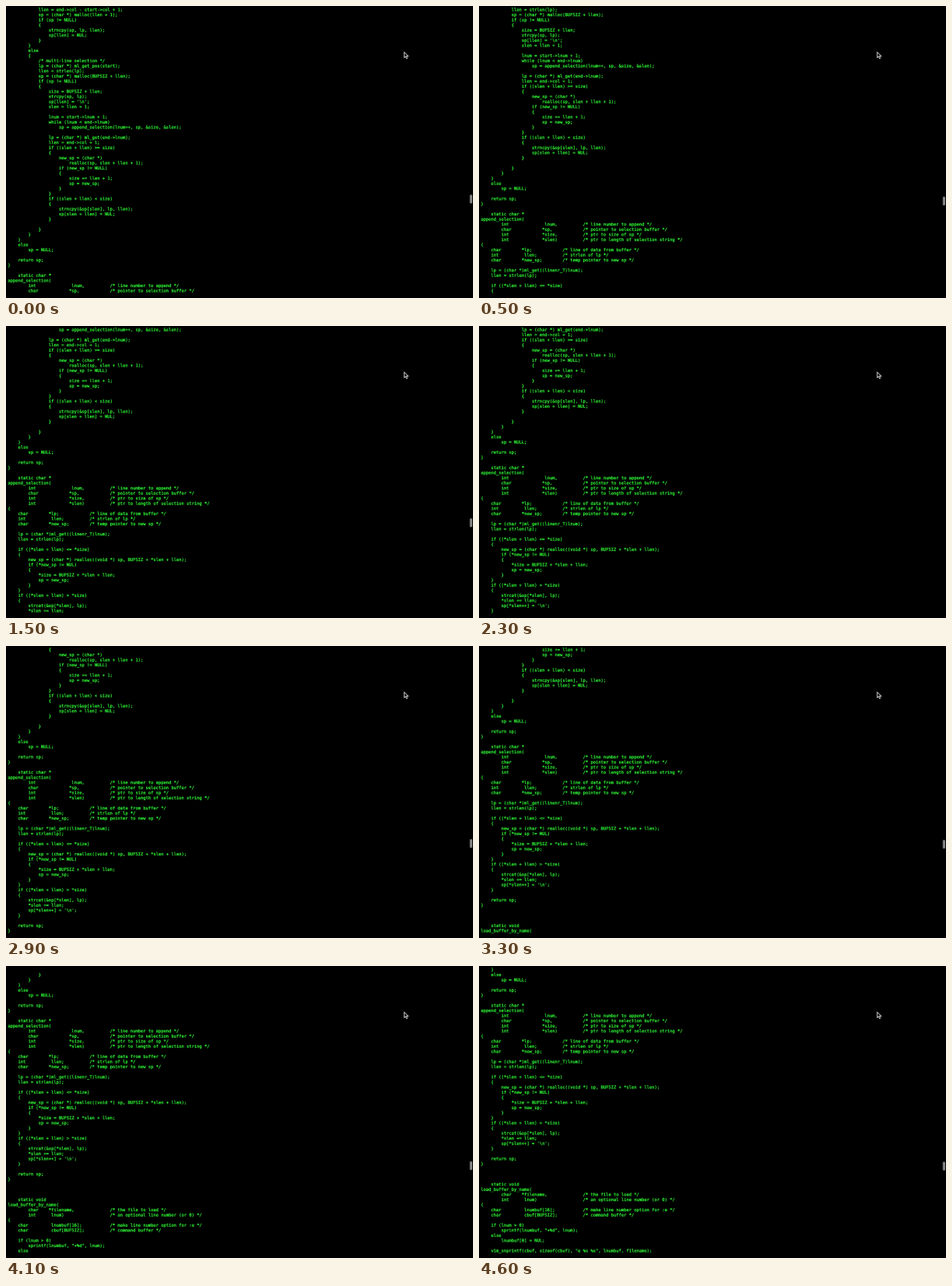
Write an HTML page with a canvas that moves like this. It is 600 px wide and 375 px high and loops after 5100 ms.

```html
<!DOCTYPE html>
<html lang="en">
<head>
<meta charset="utf-8">
<title>Scrolling code</title>
<style>
  html, body { margin: 0; width: 100%; height: 100%; overflow: hidden; background: #000; }
  canvas { display: block; width: 600px; height: 375px; }
</style>
</head>
<body>
<canvas id="stage" width="600" height="375"></canvas>
<script>
const LINES = String.raw`            llen = end->col - start->col + 1;
            sp = (char *) malloc(llen + 1);
            if (sp != NULL)
            {
                strncpy(sp, lp, llen);
                sp[llen] = NUL;
            }
        }
        else
        {
            /* multi-line selection */
            lp = (char *) ml_get_pos(start);
            llen = strlen(lp);
            sp = (char *) malloc(BUFSIZ + llen);
            if (sp != NULL)
            {
                size = BUFSIZ + llen;
                strcpy(sp, lp);
                sp[llen] = '\n';
                slen = llen + 1;

                lnum = start->lnum + 1;
                while (lnum < end->lnum)
                    sp = append_selection(lnum++, sp, &size, &slen);

                lp = (char *) ml_get(end->lnum);
                llen = end->col + 1;
                if ((slen + llen) >= size)
                {
                    new_sp = (char *)
                        realloc(sp, slen + llen + 1);
                    if (new_sp != NULL)
                    {
                        size += llen + 1;
                        sp = new_sp;
                    }
                }
                if ((slen + llen) < size)
                {
                    strncpy(&sp[slen], lp, llen);
                    sp[slen + llen] = NUL;
                }

            }
        }
    }
    else
        sp = NULL;

    return sp;
}

    static char *
append_selection(
        int              lnum,          /* line number to append */
        char            *sp,            /* pointer to selection buffer */
        int             *size,          /* ptr to size of sp */
        int             *slen)          /* ptr to length of selection string */
{
    char        *lp;            /* line of data from buffer */
    int          llen;          /* strlen of lp */
    char        *new_sp;        /* temp pointer to new sp */

    lp = (char *)ml_get((linenr_T)lnum);
    llen = strlen(lp);

    if ((*slen + llen) <= *size)
    {
        new_sp = (char *) realloc((void *) sp, BUFSIZ + *slen + llen);
        if (*new_sp != NUL)
        {
            *size = BUFSIZ + *slen + llen;
            sp = new_sp;
        }
    }
    if ((*slen + llen) > *size)
    {
        strcat(&sp[*slen], lp);
        *slen += llen;
        sp[*slen++] = '\n';
    }

    return sp;
}



    static void
load_buffer_by_name(
        char    *filename,              /* the file to load */
        int      lnum)                  /* an optional line number (or 0) */
{
    char         lnumbuf[16];           /* make line number option for :e */
    char         cbuf[BUFSIZ];          /* command buffer */

    if (lnum > 0)
        sprintf(lnumbuf, "+%d", lnum);
    else
        lnumbuf[0] = NUL;

    vim_snprintf(cbuf, sizeof(cbuf), "e %s %s", lnumbuf, filename);`.split("\n");

const LOOP = 5100, TICK = 100;
const ROWS = 56, LINE_HEIGHT = 14, LEFT = 5, BASELINE = 14;

// [time, value] keys
const SCROLL = [[200, 0], [500, 12], [1000, 12], [1100, 16], [1600, 25], [2300, 25],
  [2900, 28], [3300, 33], [3800, 39], [4400, 44], [4500, 44], [4600, 45]];
const BAR_ALPHA = [[1600, 1], [2300, 0], [2500, 1]];

// The screen is drawn at full size, then scaled down onto the stage.
const screen = document.createElement("canvas");
screen.width = 1280;
screen.height = 800;
const ctx = screen.getContext("2d");
const stage = document.getElementById("stage").getContext("2d");
stage.imageSmoothingQuality = "high";

function valueAt(keys, time) {
  const next = keys.findIndex(([t]) => t >= time);
  if (next === 0) return keys[0][1];
  if (next < 0) return keys[keys.length - 1][1];
  const [t0, v0] = keys[next - 1], [t1, v1] = keys[next];
  return v0 + (v1 - v0) * (time - t0) / (t1 - t0);
}

function drawText(top) {
  ctx.font = '11.63px "DejaVu Sans Mono", monospace';
  ctx.textRendering = "geometricPrecision";
  ctx.fillStyle = ctx.strokeStyle = "#30ff38";
  ctx.lineWidth = 0.55;
  LINES.slice(top, top + ROWS).forEach((line, row) => {
    const code = line.trimStart();
    const x = LEFT + (line.length - code.length) * 7;
    const y = BASELINE + row * LINE_HEIGHT;
    ctx.fillText(code, x, y);
    ctx.strokeText(code, x, y);
  });
}

function drawScrollbar(top, alpha) {
  ctx.globalAlpha = alpha;
  ctx.fillStyle = "#858585";
  ctx.beginPath();
  ctx.roundRect(1271, 517 + top * 0.43, 7, 24, 3.5);
  ctx.fill();
  ctx.globalAlpha = 1;
}

function drawPointer() {
  const arrow = new Path2D("M1091.5 126.5v15l3.4-3.2 2.5 5.8 2.7-1.1-2.5-5.7h4.8z");
  ctx.fillStyle = "#000";
  ctx.fill(arrow);
  ctx.strokeStyle = "#fff";
  ctx.lineWidth = 1.5;
  ctx.stroke(arrow);
}

function drawScreen(time) {
  const top = Math.round(valueAt(SCROLL, time));
  ctx.fillStyle = "#000";
  ctx.fillRect(0, 0, screen.width, screen.height);
  drawText(top);
  drawScrollbar(top, valueAt(BAR_ALPHA, time));
  drawPointer();
  stage.drawImage(screen, 0, 0, 600, 375);
}

const start = performance.now();
let shown = -1;
function loop() {
  const elapsed = performance.now() - start;
  const time = Math.floor((elapsed % LOOP) / TICK) * TICK;
  if (time !== shown) drawScreen(time);
  shown = time;
  requestAnimationFrame(loop);
}
loop();
</script>
</body>
</html>
```
